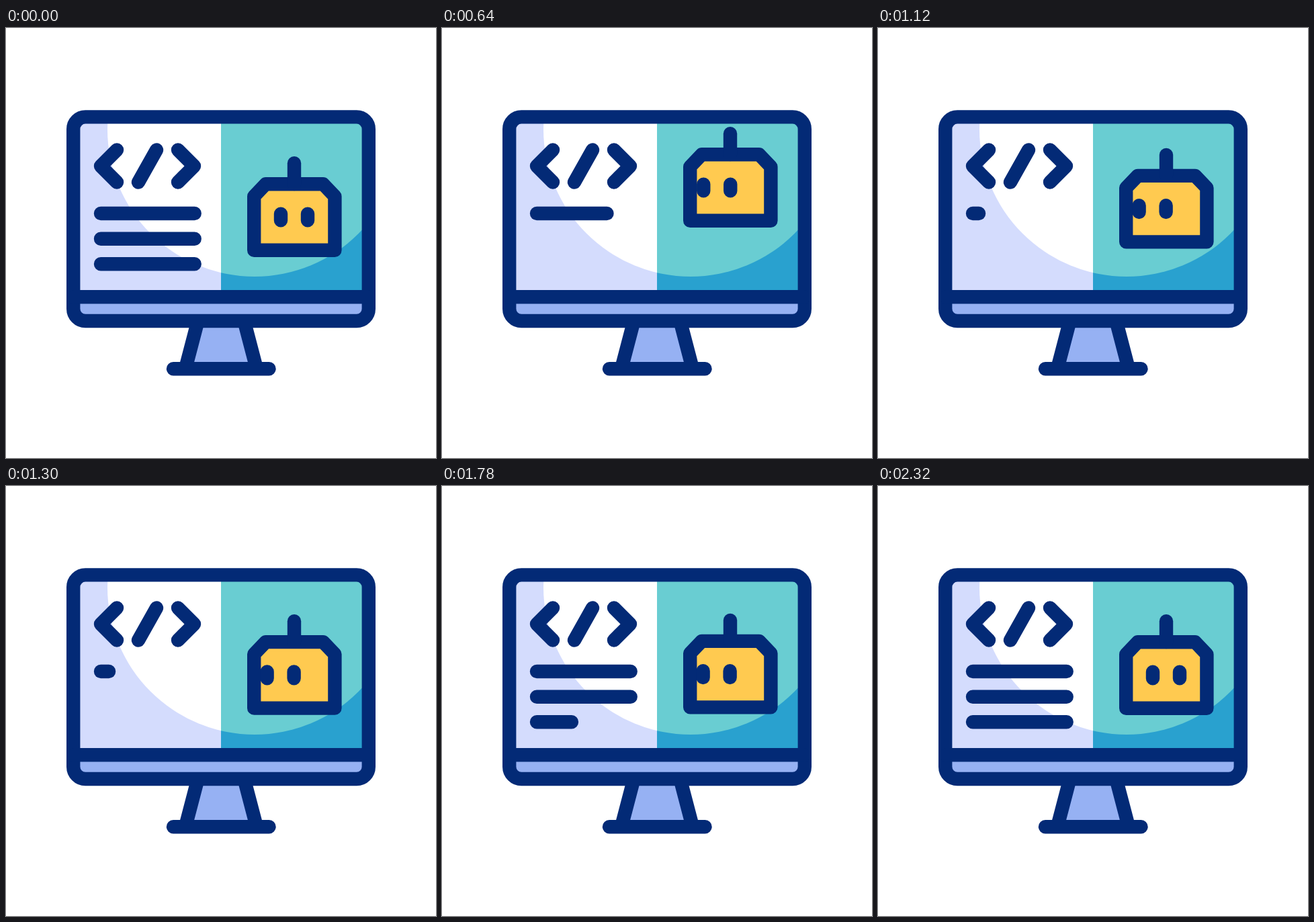
An HTML page for the animation above (2400 ms loop, 640x640 px).

```html
<!DOCTYPE html>
<html lang="en">
<head>
<meta charset="utf-8">
<title>Robot monitor</title>
<style>
html, body { margin: 0; width: 100%; height: 100%; overflow: hidden; background: #fff; }
svg { display: block; width: 100vw; height: 100vh; }
.ink { fill: none; stroke: #032a76; stroke-width: 20.4; stroke-linecap: round; stroke-linejoin: round; }
</style>
</head>
<body>
<svg viewBox="0 0 640 640">
  <defs>
    <clipPath id="screen"><path d="M100 132H540V400H100Z"/></clipPath>
    <clipPath id="left"><path d="M100 132H320V400H100Z"/></clipPath>
    <clipPath id="right"><path d="M320 132H540V400H320Z"/></clipPath>
  </defs>

  <path d="M285 436H355L373 507H267Z" fill="#96b1f3"/>
  <path class="ink" d="M285.6 436L267 507M354.4 436L373 507M249 507.2H391.5"/>

  <rect x="100" y="132" width="440" height="304" rx="18" fill="#96b1f3"/>
  <path d="M118 132H320V400H100V150Q100 132 118 132Z" fill="#d4dcfd"/>
  <path d="M320 132H522Q540 132 540 150V400H320Z" fill="#29a1cf"/>
  <circle cx="370" cy="151" r="219" fill="#fff" clip-path="url(#left)"/>
  <circle cx="370" cy="151" r="219" fill="#69cdd2" clip-path="url(#right)"/>
  <rect class="ink" x="100.2" y="132.4" width="439.6" height="303.6" rx="18"/>
  <path class="ink" d="M101 400.2H539"/>

  <path class="ink" d="M165 181.5L141 205.5L165 229.5M224 181.5L197 229.5M256 181.5L280 205.5L256 229.5"/>
  <path class="ink" id="lines"/>

  <g id="head">
    <path class="ink" d="M369.2 250.5L386.6 232.3H472L489.4 250.5V330.8H369.2Z" style="fill:#ffca50"/>
    <path class="ink" d="M429 201.3V232"/>
    <path class="ink" id="eyes" d="M409 276.6V286.4M449 276.6V286.4"/>
  </g>
</svg>
<script>
const LOOP = 2400;
const LEFT = 141, LEN = 139.7, ROWS = [276, 313.8, 351.2];
const FULL = LEN * ROWS.length, STUB = 9;
const $ = id => document.getElementById(id);
const lines = $('lines'), head = $('head'), eyes = $('eyes');

// Symmetric bezier (a,0)-(1-a,1), solved for x by bisection
function ease(x, a) {
  let lo = 0, hi = 1;
  for (let i = 0; i < 24; i++) {
    const u = (lo + hi) / 2, v = 1 - u;
    const bx = 3 * u * v * v * a + 3 * u * u * v * (1 - a) + u * u * u;
    if (bx < x) lo = u; else hi = u;
  }
  return lo * lo * (3 - 2 * lo);
}

// Steps: [start, end, value reached]
function track(t, from, steps, a) {
  let value = from;
  for (const [start, end, to] of steps) {
    if (t <= start) break;
    if (t >= end) { value = to; continue; }
    return value + (to - value) * ease((t - start) / (end - start), a);
  }
  return value;
}

const INK = [[0, 1140, STUB], [1176, 2236, FULL]];
const LIFT = [[50, 590, -44], [765, 1325, 0], [1325, 1560, -20.5], [1560, 1830, 0]];
const LOOK = [[360, 680, -20.4], [2000, 2320, 0]];

// One stroke budget spread over the rows in order
function rowPath(ink) {
  let d = '';
  ROWS.forEach((y, i) => {
    const w = Math.min(LEN, ink - i * LEN);
    if (w > 0.05) d += `M${LEFT} ${y}h${w.toFixed(2)}`;
  });
  return d;
}

function draw(t) {
  lines.setAttribute('d', rowPath(track(t, FULL, INK, 0.85)));
  head.setAttribute('transform', `translate(0 ${track(t, 0, LIFT, 0.4).toFixed(2)})`);
  eyes.setAttribute('transform', `translate(${track(t, 0, LOOK, 0.4).toFixed(2)} 0)`);
}

const begin = performance.now();
function tick() {
  draw((performance.now() - begin) % LOOP);
  requestAnimationFrame(tick);
}
draw(0);
requestAnimationFrame(tick);
</script>
</body>
</html>
```
